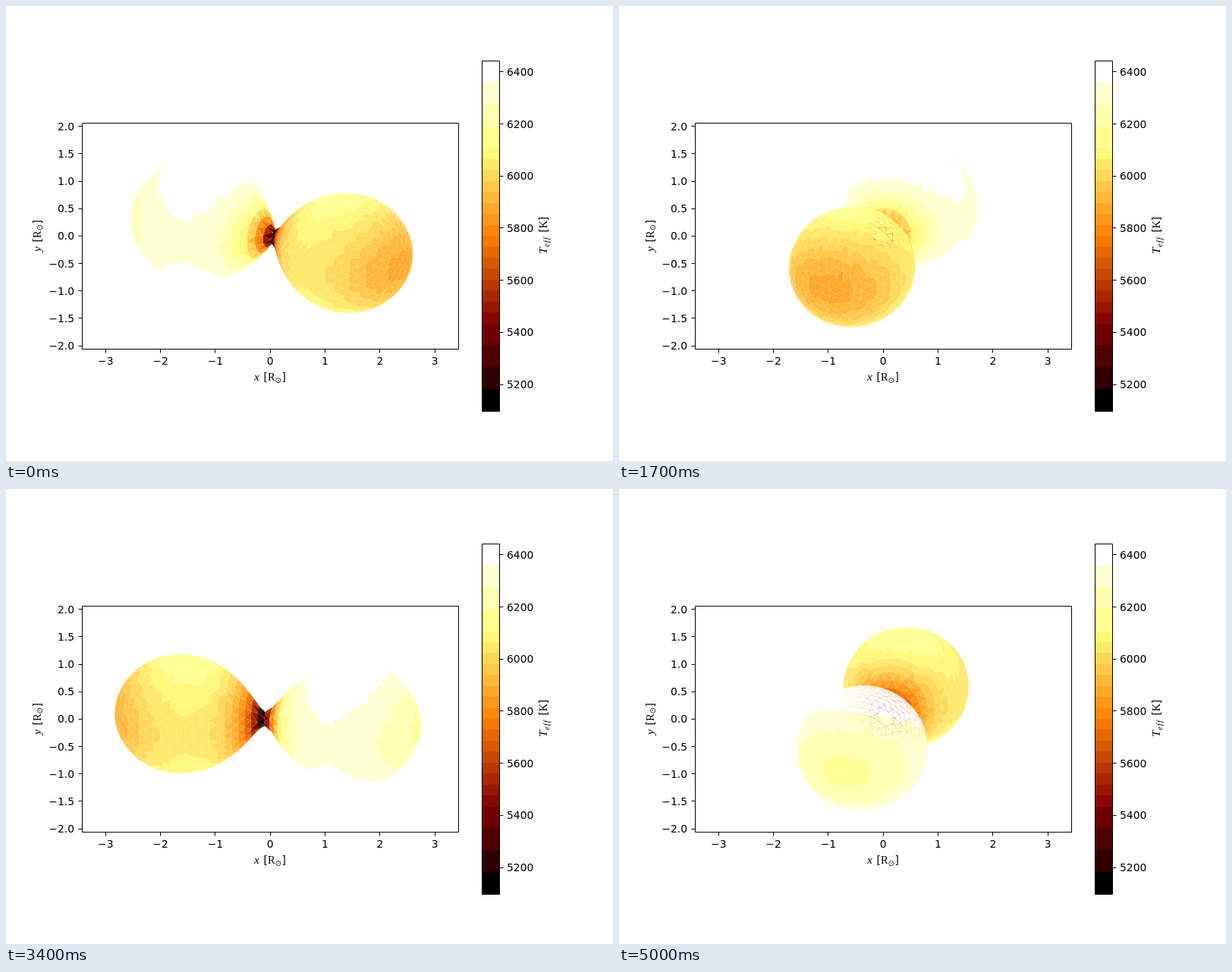
Recreate the animation shown at these times as an HTML page with a canvas. Size 800x600 px, loop 5.1 s.

```html
<!DOCTYPE html>
<html lang="en">
<head>
<meta charset="utf-8">
<title>Contact binary</title>
<style>
html, body { margin: 0; width: 100%; height: 100%; overflow: hidden; background: #fff; }
canvas, svg { position: absolute; left: 0; top: 0; }
text { font: 13.89px "DejaVu Sans", sans-serif; white-space: pre; }
.rm { font: 14.4px "Liberation Serif", serif; }
.it { font: italic 15.5px "Liberation Serif", serif; }
.sub { font: italic 10.8px "Liberation Serif", serif; letter-spacing: 1px; }
.sun { font: 10px "DejaVu Sans", sans-serif; }
.line { fill: none; stroke: #000; stroke-width: 1; }
</style>
</head>
<body>
<canvas id="stars" width="800" height="600"></canvas>
<svg id="axes" width="800" height="600" viewBox="0 0 800 600"></svg>
<script>
const STEP = 100, FRAMES = 51;
const SCALE = 72.3, CX = 348.2, CY = 303.4;
const T_MIN = 5098, T_BAND = 42.05, BANDS = 32;

// Binary: unit separation, primary at x = 0, secondary at x = 1.
const Q = 0.92, SEP = 3.1, EDGE = 0.056, BETA = 0.08;
const COS_I = 0.364, SIN_I = Math.sqrt(1 - COS_I * COS_I);
const START = -31.15, TURN = 16.53;

function bandColor(k) {
  k = Math.max(0, Math.min(BANDS - 1, k));
  if (k < 2) return '#000';
  if (k >= 30) return '#fff';
  const v = k < 8 || k >= 24 ? (Math.floor(k / 2) * 2 + 1) / BANDS : (k + 0.5) / BANDS;
  const ch = off => Math.round(255 * Math.max(0, Math.min(1, 2 * v - off)));
  return `rgb(${ch(0)},${ch(0.5)},${ch(1)})`;
}

function bisect(f, lo, hi) {
  for (let i = 0; i < 40; i++) {
    const mid = (lo + hi) / 2;
    if (f(mid) > 0) lo = mid; else hi = mid;
  }
  return lo;
}

function potential(x, y, z) {
  const s = y * y + z * z;
  return 1 / Math.sqrt(x * x + s) + Q / Math.sqrt((x - 1) ** 2 + s)
    + (1 + Q) / 2 * (x * x + y * y) - Q * x;
}

function gravity([x, y, z]) {
  const s = y * y + z * z;
  const a = (x * x + s) ** -1.5, b = Q * ((x - 1) ** 2 + s) ** -1.5;
  return Math.hypot(
    -x * a - (x - 1) * b + (1 + Q) * x - Q,
    y * (1 + Q - a - b),
    z * (a + b));
}

const L1 = bisect(x => 1 / (x * x) - Q / (1 - x) ** 2 - (1 + Q) * x + Q, 0.3, 0.7);
const SURFACE = potential(L1, 0, 0) - 0.0135;

// Rings of points from the far pole to the neck, stitched into triangles.
function buildStar(center, dir, tPole) {
  const neckX = Math.abs(L1 - center), row = EDGE * 0.866;
  const place = (r, t, phi) => [
    center + dir * r * Math.cos(t),
    r * Math.sin(t) * Math.cos(phi),
    r * Math.sin(t) * Math.sin(phi)];
  const radius = (t, phi) => {
    const c = Math.cos(t), max = c > 0 ? Math.min(0.62, neckX / c) : 0.62;
    return bisect(r => potential(...place(r, t, phi)) - SURFACE, 0.05, max);
  };
  const neckPoint = phi => {
    const at = p => [L1, p * Math.cos(phi), p * Math.sin(phi)];
    return at(bisect(p => potential(...at(p)) - SURFACE, 0, 0.3));
  };
  const ring = (n, shift, point) => ({
    n, shift,
    pts: Array.from({ length: n }, (_, k) => point(2 * Math.PI * (k + shift) / n))
  });

  const rings = [ring(1, 0, () => place(radius(Math.PI, 0), Math.PI, 0))];
  let t = Math.PI;
  for (;;) {
    const r0 = radius(t, 0), slope = (radius(t - 0.01, 0) - r0) / 0.01;
    t -= row / Math.hypot(r0, slope);
    const r = radius(t, 0);
    if (t <= 0 || neckX - r * Math.cos(t) < row * 0.4) break;
    const n = Math.max(6, Math.round(2 * Math.PI * r * Math.sin(t) / EDGE));
    const ringT = t;
    rings.push(ring(n, rings.length % 2 / 2, phi => place(radius(ringT, phi), ringT, phi)));
  }
  rings.push(ring(6, rings.length % 2 / 2, neckPoint));

  const gPole = gravity(place(radius(Math.PI / 2, Math.PI / 2), Math.PI / 2, Math.PI / 2));
  const temp = p => tPole * (gravity(p) / gPole) ** BETA;
  const tris = [];
  const add = (a, b, c) => {
    const u = b.map((v, i) => v - a[i]), w = c.map((v, i) => v - a[i]);
    const mid = a.map((v, i) => (v + b[i] + c[i]) / 3);
    const out = (u[1] * w[2] - u[2] * w[1]) * (mid[0] - center)
      + (u[2] * w[0] - u[0] * w[2]) * mid[1]
      + (u[0] * w[1] - u[1] * w[0]) * mid[2];
    const mean = (temp(a) + temp(b) + temp(c)) / 3;
    tris.push({
      pts: out < 0 ? [a, c, b] : [a, b, c],
      color: bandColor(Math.floor((mean - T_MIN) / T_BAND))
    });
  };
  for (let k = 1; k < rings.length; k++) {
    const A = rings[k - 1], B = rings[k];
    const a = i => A.pts[i % A.n], b = j => B.pts[j % B.n];
    let i = 0, j = 0;
    while (i < A.n || j < B.n) {
      const stepA = j === B.n
        || (i < A.n && (i + 1 + A.shift) / A.n <= (j + 1 + B.shift) / B.n);
      if (stepA) {
        if (A.n > 1) add(a(i), a(i + 1), b(j));
        i++;
      } else {
        add(a(i), b(j + 1), b(j));
        j++;
      }
    }
  }
  return tris;
}

const mesh = [...buildStar(0, 1, 6443), ...buildStar(1, -1, 6140)];
const ctx = document.getElementById('stars').getContext('2d');

function draw(frame) {
  const angle = (START + TURN * frame) * Math.PI / 180;
  const c = Math.cos(angle), s = Math.sin(angle);
  const project = ([x, y, z]) => {
    const X = (x - Q / (1 + Q)) * SEP, Y = y * SEP, Z = z * SEP;
    const px = X * c - Y * s, py = X * s + Y * c;
    return [
      CX + SCALE * px,
      CY - SCALE * (py * COS_I + Z * SIN_I),
      Z * COS_I - py * SIN_I];
  };
  const visible = [];
  for (const tri of mesh) {
    const [a, b, d] = tri.pts.map(project);
    const area = (b[0] - a[0]) * (d[1] - a[1]) - (b[1] - a[1]) * (d[0] - a[0]);
    if (area < 0) visible.push({ a, b, d, depth: a[2] + b[2] + d[2], color: tri.color });
  }
  visible.sort((p, q) => p.depth - q.depth);
  ctx.clearRect(0, 0, 800, 600);
  for (const { a, b, d, color } of visible) {
    ctx.fillStyle = color;
    ctx.beginPath();
    ctx.moveTo(a[0], a[1]);
    ctx.lineTo(b[0], b[1]);
    ctx.lineTo(d[0], d[1]);
    ctx.fill();
  }
}

function buildAxes() {
  const out = [];
  const line = d => out.push(`<path class="line" d="${d}"/>`);
  const text = (x, y, anchor, str) =>
    out.push(`<text x="${x}" y="${y}" text-anchor="${anchor}">${str}</text>`);
  const label = (x, y, turn, parts) => {
    const spans = parts.map(([dx, dy, cls, str]) =>
      `<tspan x="${dx}" y="${dy}" class="${cls}">${str}</tspan>`).join('');
    out.push(`<text transform="translate(${x} ${y}) rotate(${turn})">${spans}</text>`);
  };
  const num = (v, digits) => v.toFixed(digits).replace('-', '\u2212');
  const snap = v => Math.floor(v) + 0.5;

  const barTop = 72, barH = 462, cell = barH / BANDS;
  for (let k = 0; k < BANDS; k++) {
    const y0 = Math.round(barTop + barH - (k + 1) * cell);
    const y1 = Math.round(barTop + barH - k * cell);
    out.push(`<rect x="627" y="${y0}" width="23" height="${y1 - y0}" fill="${bandColor(k)}"/>`);
  }
  line('M627.5 72.5H650.5V534.5H627.5Z');
  for (let T = 5200; T <= 6400; T += 200) {
    const y = 499 - (T - 5200) * 0.3434;
    line(`M650.5 ${snap(y)}h5`);
    text(660, y + 5, 'start', T);
  }

  line('M100.5 154.5H596.5V452.5H100.5Z');
  for (let v = -3; v <= 3; v++) {
    const x = CX + v * SCALE;
    line(`M${snap(x)} 452.5v5`);
    text(x, 473, 'middle', num(v, 0));
  }
  for (let v = -2; v <= 2; v += 0.5) {
    const y = CY - v * SCALE;
    line(`M100.5 ${snap(y)}h-5`);
    text(90, y + 5, 'end', num(v, 1));
  }

  const solar = name => [
    [0, 0, 'it', name], [12.6, 0, '', '['], [18, 0, 'rm', 'R'],
    [27.4, 2.5, 'sun', '\u2299'], [36.5, 0, '', ']']];
  label(327, 494, 0, solar('x'));
  label(45.5, 324, -90, solar('y'));
  label(713, 327, -90, [
    [0, 0, 'it', 'T'], [9, 2.5, 'sub', 'eff'], [28.5, 0, '', '['],
    [33.8, 0, 'rm', 'K'], [43.8, 0, '', ']']]);
  document.getElementById('axes').innerHTML = out.join('');
}

buildAxes();
const begin = performance.now();
let shown = -1;
function tick() {
  const frame = Math.floor((performance.now() - begin) / STEP) % FRAMES;
  if (frame !== shown) draw(shown = frame);
  requestAnimationFrame(tick);
}
tick();
</script>
</body>
</html>
```
